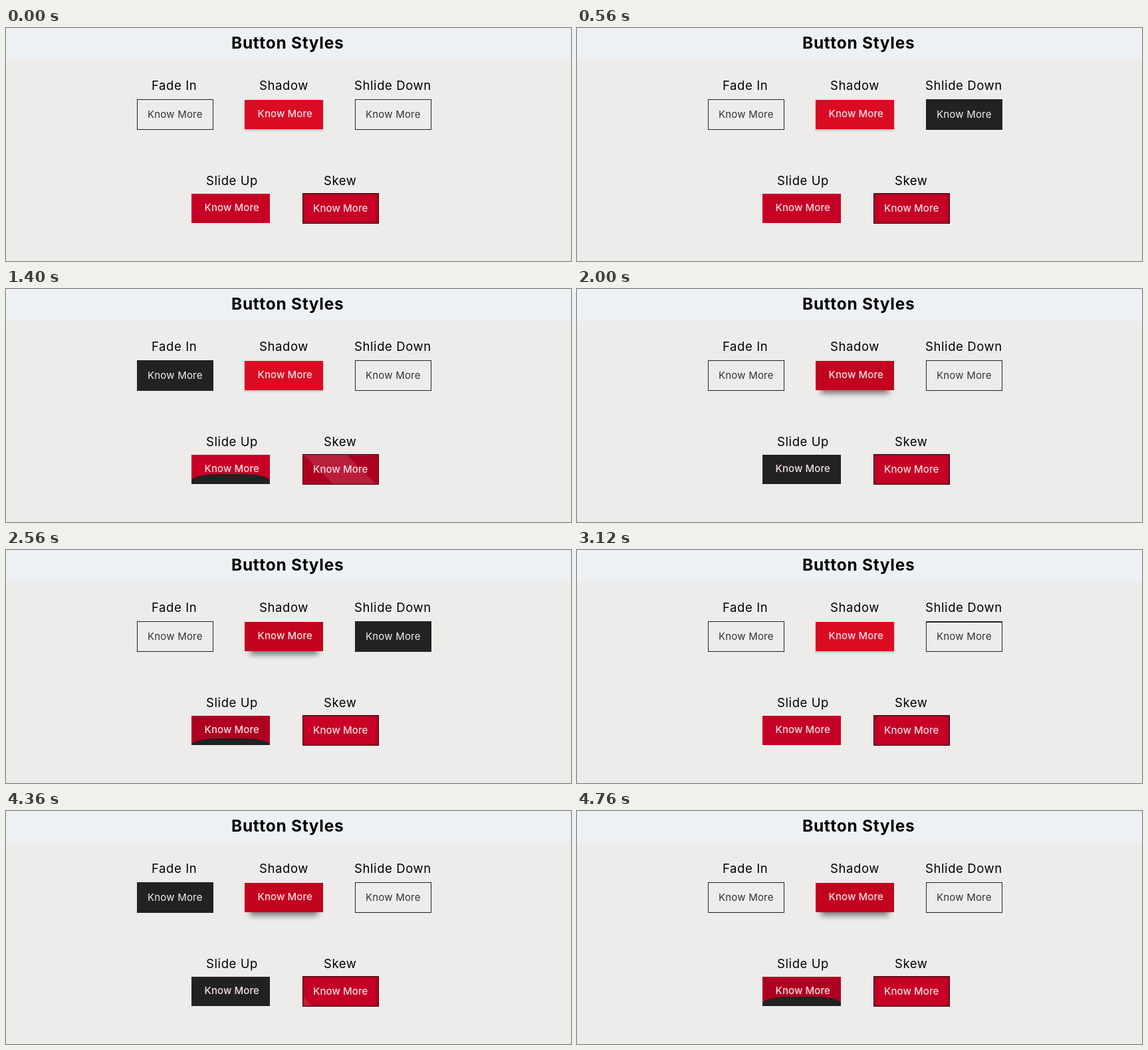
Recreate the animation shown at these times as an HTML page. Size 850 by 350 pixels, loop 4800 ms.

```html
<!DOCTYPE html>
<html lang="en">
<head>
<meta charset="utf-8">
<title>Button Styles</title>
<style>
  html, body { margin: 0; width: 100%; height: 100%; overflow: hidden; }
  body { position: relative; background: #edecea; font-family: Inter, "Open Sans", sans-serif; color: #000; }
  header { position: absolute; top: 0; left: 0; width: 100%; height: 48px; background: #edf1f4; }
  h1, h2 { position: absolute; margin: 0; white-space: nowrap; }
  h1 { left: 339px; top: 8px; font: 700 24.5px/29px Inter, sans-serif; letter-spacing: .7px; }
  h2 { font: 400 18.5px/20px Inter, sans-serif; letter-spacing: .6px; }
  .btn { position: absolute; box-sizing: border-box; overflow: hidden; }
  .boxed { width: 115px; height: 46px; border: 1px solid #222; }
  .flat { width: 118px; height: 44px; }
  .btn span { position: absolute; left: 15px; top: 0; font-size: 15px; line-height: 44px; letter-spacing: .2px; white-space: nowrap; }
  .flat span { left: 19.5px; top: -1px; }
  .red span { color: #f6dfe4; font-weight: 500; letter-spacing: .08px; }
  .btn i { position: absolute; left: 0; width: 100%; background: #222; }
  #down i { top: 0; }
  #up i { bottom: 0; }
  #skew { border-color: #35040f; }
  #skew i { left: 23px; top: -1px; width: 64px; height: 46px; background: rgba(255, 255, 255, .12); }
</style>
</head>
<body>
<header><h1>Button Styles</h1></header>

<h2 style="left:219px;top:75.5px">Fade In</h2>
<div class="btn boxed" id="fade" style="left:197px;top:107px"><span>Know More</span></div>

<h2 style="left:381px;top:75.5px">Shadow</h2>
<div class="btn flat red" id="shadow" style="left:359px;top:108px"><span>Know More</span></div>

<h2 style="left:524px;top:75.5px">Shlide Down</h2>
<div class="btn boxed" id="down" style="left:525px;top:107px"><i></i><span>Know More</span></div>

<h2 style="left:301px;top:218.5px">Slide Up</h2>
<div class="btn flat red" id="up" style="left:279px;top:249px"><i></i><span>Know More</span></div>

<h2 style="left:478px;top:218.5px">Skew</h2>
<div class="btn boxed red" id="skew" style="left:446px;top:248px"><i></i><span>Know More</span></div>

<script>
const LOOP = 4800;

// Per button: transition length, then [enter, leave] times of each hover.
const hovers = {
  fade:   { ms: 300, spans: [[860, 1700], [3584, 4400]] },
  shadow: { ms: 300, spans: [[1480, 2600], [3350, 5000]] },
  down:   { ms: 300, spans: [[120, 780], [2160, 2847]] },
  up:     { ms: 400, spans: [[1245, 2288], [3464, 4510]] },
  skew:   { ms: 300, spans: [[580, 1540], [3380, 4140]] }
};

const clamp = v => Math.min(1, Math.max(0, v));
const ease = v => { v = clamp(v); return v * v * (3 - 2 * v); };
const mix = (a, b, p) => a + (b - a) * p;
const blend = (a, b, p) => `rgb(${a.map((v, i) => Math.round(mix(v, b[i], p)))})`;
const textColor = p => blend([51, 51, 51], [240, 240, 240], p);

function level({ ms, spans }, t) {
  return spans.reduce((sum, [enter, leave]) =>
    sum + ease((t - enter) / ms) - ease((t - leave) / ms), 0);
}

const parts = {};
for (const id in hovers) {
  const el = document.getElementById(id);
  parts[id] = { box: el.style, fill: el.querySelector("i")?.style, text: el.querySelector("span").style };
}

const paint = {
  fade({ box, text }, p) {
    box.backgroundColor = `rgba(34,34,34,${p})`;
    text.color = textColor(p);
  },
  shadow({ box }, p) {
    box.backgroundColor = blend([218, 12, 36], [194, 4, 31], p);
    box.boxShadow = `0 ${mix(2, 13, p)}px ${mix(3, 9, p)}px ${mix(0, -8, p)}px rgba(0,0,0,${mix(.22, .5, p)})`;
  },
  down({ fill, text }, p) {
    fill.height = 44 * p + "px";
    text.color = textColor(clamp((p - .4) / .6));
  },
  up({ box, fill }, p, leaving) {
    box.backgroundColor = blend([199, 0, 37], [174, 0, 33], leaving ? clamp(p * 4) : 0);
    fill.height = 44 * p + "px";
    const round = clamp((1 - p) * 1.6);
    fill.borderRadius = `${40 * round}px ${40 * round}px 0 0 / ${10 * round}px ${10 * round}px 0 0`;
  },
  skew({ box, fill }, p) {
    box.backgroundColor = blend([200, 0, 37], [174, 0, 33], p);
    box.boxShadow = `inset 0 0 4px rgba(0,0,0,${.45 * (1 - p)})`;
    fill.transform = `translateX(${-115 * (1 - p)}px) skewX(45deg)`;
  }
};

const start = performance.now();

function draw(now) {
  const t = Math.max(0, now - start) % LOOP;
  for (const id in hovers) {
    const hover = hovers[id];
    const leaving = hover.spans.some(([, leave]) => t >= leave && t < leave + hover.ms);
    paint[id](parts[id], level(hover, t), leaving);
  }
  requestAnimationFrame(draw);
}
draw(start);
</script>
</body>
</html>
```
